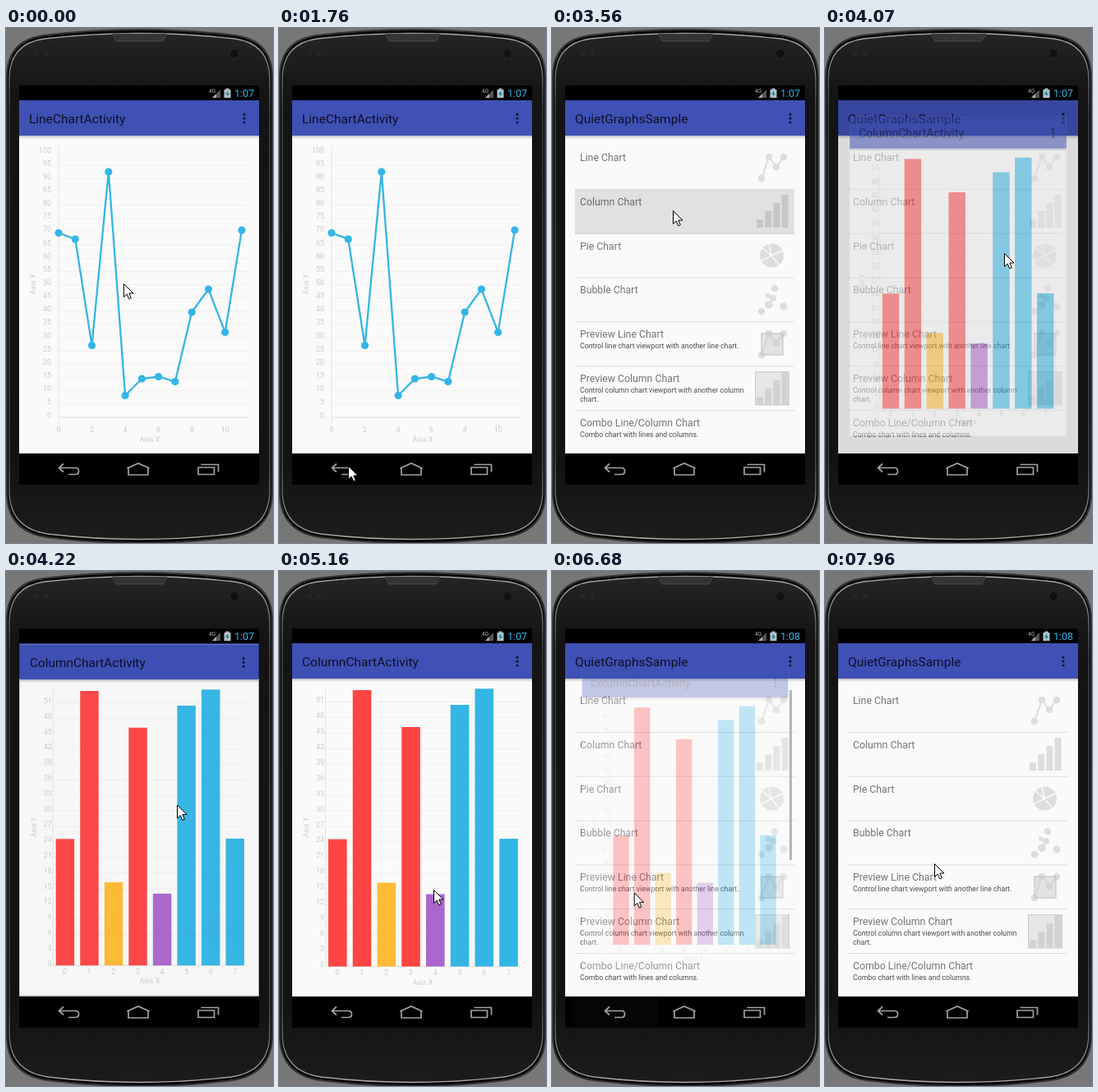
Animation of 325x627 px, one loop 8000 ms. Source, as an HTML page:

```html
<!DOCTYPE html>
<html lang="en">
<head>
<meta charset="utf-8">
<title>Chart app on a phone</title>
<style>
  html, body { margin: 0; width: 100%; height: 100%; overflow: hidden; background: #777; }
  svg { display: block; width: 100%; height: 100%; }
  text { font-family: Roboto, "Noto Sans", sans-serif; }
  .title { font-size: 15.5px; fill: #0d1026; }
  .item { font-size: 12.3px; fill: #747474; }
  .sub { font-size: 8.75px; fill: #4c4c4c; }
  .label { font-size: 9px; fill: #cbcbcb; }
  .icon { fill: #ddd; stroke: #ddd; stroke-width: 0; }
  .nav { fill: none; stroke: #a2a2a2; stroke-width: 1.7; }
</style>
</head>
<body>
<svg viewBox="0 0 325 627" preserveAspectRatio="none">
  <defs>
    <linearGradient id="shade" x2="0" y2="1">
      <stop offset="0" stop-opacity=".24"/><stop offset="1" stop-opacity="0"/>
    </linearGradient>
    <linearGradient id="shell" x2="0" y2="1">
      <stop offset="0" stop-color="#252525"/><stop offset=".12" stop-color="#141414"/>
      <stop offset=".85" stop-color="#131313"/><stop offset="1" stop-color="#1c1c1c"/>
    </linearGradient>
    <linearGradient id="rim" x2="0" y2="1">
      <stop offset="0" stop-color="#aaa"/><stop offset=".15" stop-color="#4a4a4a"/>
      <stop offset=".85" stop-color="#555"/><stop offset="1" stop-color="#aaa"/>
    </linearGradient>
    <clipPath id="screen"><rect x="16" y="88" width="292" height="430"/></clipPath>
    <clipPath id="navClip"><rect x="16" y="518" width="292" height="38"/></clipPath>
  </defs>

  <rect width="325" height="627" fill="#777"/>
  <path d="M1 60Q1 15 46 9Q162 -5 279 9Q324 15 324 60V565Q324 613 275 620Q162 634 50 620Q1 613 1 565Z" fill="#050505" stroke="#333" stroke-width="2"/>
  <path d="M4 62Q4 19 47 13Q162 0 278 13Q321 19 321 62V563Q321 609 274 616Q162 629 51 616Q4 609 4 563Z" fill="url(#shell)" stroke="url(#rim)" stroke-width="1.3"/>
  <path d="M129 7H196L191 16H134Z" fill="#343434" stroke="#555" stroke-width=".7"/>
  <g fill="#262626"><circle cx="37" cy="31" r="3"/><circle cx="49" cy="31" r="3"/></g>
  <circle cx="278" cy="31" r="5.5" fill="#111" stroke="#272727"/>

  <rect x="16" y="70" width="292" height="486"/>
  <g>
    <text x="247" y="79" font-size="6.5" fill="#bbb">4G</text>
    <path d="M251 85L261 75V85Z" fill="#555"/><path d="M251 85L256 80V85Z" fill="#aaa"/>
    <path d="M265.500 75H267.500V73.500H271.500V75H273.500V85H265.500Z" fill="#b5c3c8"/>
    <path d="M270.500 76L267 80.500H269.500L268.500 84L272 79.500H269.700Z" fill="#087b9f"/>
    <text id="clock" x="302" y="84" text-anchor="end" font-size="12.500" fill="#33b5e5"></text>
  </g>

  <g clip-path="url(#screen)">
    <g id="list"></g>
    <rect id="press" x="28" y="197" width="267" height="53.500" opacity="0"/>
    <rect id="scroll" x="289" y="145" width="3" height="207" fill="#b4b4b4"/>
    <rect id="dim" x="16" y="88" width="292" height="430"/>
    <g id="line"></g>
    <g id="column"></g>
  </g>

  <circle id="ripple" cx="77" cy="537" fill="#fff" clip-path="url(#navClip)"/>
  <g class="nav">
    <path d="M70 530.500L64.500 535.500L70 540.500M64.500 535.500H84.500Q88.500 535.500 88.500 539.500T84.500 543.500H76"/>
    <path d="M147.500 536L161 530L174.500 536H173V544H149V536Z"/>
    <path d="M234 535H253.500V543.500H234ZM237.500 531.500H258.500V540.500"/>
  </g>
  <path id="cursor" d="M.5.5V16.500L4.200 13L6.700 18.800L9.300 17.700L6.800 12H12Z" fill="#fff" stroke="#000"/>
</svg>
<script>
const $ = id => document.getElementById(id);
const text = (cls, x, y, s, more = '') => `<text class="${cls}" x="${x}" y="${y}" ${more}>${s}</text>`;
const rect = (x, y, w, h, fill) => `<rect x="${x}" y="${y}" width="${w}" height="${h}"${fill ? ` fill="${fill}"` : ''}/>`;
const dot = (x, y, r) => `<circle cx="${x}" cy="${y}" r="${r}"/>`;
const hline = (x1, x2, y, color) => `<path d="M${x1} ${y}H${x2}" stroke="${color}"/>`;
const range = (n, f) => Array.from({ length: n }, (_, i) => f(i)).join('');

const page = (title, body) =>
  rect(16, 88, 292, 430, '#fafafa') + rect(16, 88, 292, 43, '#3f51b5') + rect(16, 131, 292, 4, 'url(#shade)') +
  text('title', 28, 115.5, title) +
  `<g fill="#10132a">${[105, 110, 115].map(y => dot(290, y, 1.6)).join('')}</g>` + body;

// List page
const zigzag = (x, y) => {
  const pts = [[x, y], [x + 9, y - 26], [x + 18, y - 14], [x + 27, y - 26]];
  return `<polyline points="${pts}" fill="none" stroke-width="2"/>` + pts.map(p => dot(...p, 4.3)).join('');
};
const stairs = y => range(4, i => rect(249 + i * 10.2, y - 10 - i * 10, 8, 10 + i * 10));
const rows = [
  ['Line Chart'], ['Column Chart'], ['Pie Chart'], ['Bubble Chart'],
  ['Preview Line Chart', 'Control line chart viewport with another line chart.'],
  ['Preview Column Chart', 'Control column chart viewport with another column', 'chart.'],
  ['Combo Line/Column Chart', 'Combo chart with lines and columns.']
];
const icons = '<g class="icon">' + zigzag(255, 183) + stairs(243) +
  dot(267.5, 277, 14.5) +
  '<path d="M267 277L264 262M267 277L281 271M267 277L254 284M267 277L277 289M267 277L255 267" stroke="#fafafa" stroke-width="1.5"/>' +
  dot(255, 345, 4.3) + dot(264, 337, 4.8) + dot(271, 317, 4.3) + dot(282, 339, 4.5) + dot(263, 326, 3) + dot(269, 329, 4) +
  zigzag(255, 398) + '<rect x="255" y="372" width="26" height="26" fill="#ccc" fill-opacity=".5" stroke="#bbb" stroke-width="1"/>' +
  '<rect x="247.5" y="418.5" width="41" height="40.500" fill="#e6e6e6" stroke="#ccc" stroke-width="1"/>' +
  `<g fill="#d2d2d2">${stairs(459)}</g></g>`;
$('list').innerHTML = page('QuietGraphsSample', rows.map(([name, ...subs], i) => {
  const y = 162 + i * 53.8;
  return text('item', 34, y, name) +
    subs.map((s, k) => text('sub', 34, y + 13.2 + k * 10.5, s)).join('') +
    (i < 6 ? hline(28, 295, y + 34.5, '#dcdcdc') : '');
}).join('') + icons);

// Chart pages
const axes = (left, zero, step, n, unit) =>
  range(n, i => {
    const y = zero - i * step;
    return hline(left, 294, y, i ? '#f0f0f0' : '#dedede') +
      text('label', 55, y + .5, i * unit, 'text-anchor="end"');
  }) +
  `<path d="M${left} 143V482" stroke="#e4e4e4"/>` +
  text('label', 175, 503.5, 'Axis X', 'text-anchor="middle"') +
  text('label', 0, 0, 'Axis Y', 'text-anchor="middle" transform="translate(36 312) rotate(-90)"');
const tick = (x, s) => text('label', x, 492, s, 'text-anchor="middle"');

const points = [249.5, 257, 386.5, 175, 447.5, 427, 424.5, 430.5, 346, 318, 370.5, 246]
  .map((y, i) => [64 + i * 20.27, y]);
$('line').innerHTML = page('LineChartActivity',
  axes(64, 474, 16.15, 21, 5) + range(6, i => tick(64 + i * 40.54, i * 2)) +
  `<polyline points="${points}" fill="none" stroke="#33b5e5" stroke-width="2.300"/>` +
  `<g fill="#33b5e5">${points.map(p => dot(...p, 4.6)).join('')}</g>`);

const [red, amber, violet, blue] = ['#f44', '#fb3', '#a6c', '#33b5e5'];
const bars = [[326.5, red], [145, red], [379.5, amber], [190, red], [393.5, violet], [163, blue], [143.3, blue], [326, blue]];
$('column').innerHTML = page('ColumnChartActivity',
  axes(56.5, 481.5, 18.94, 18, 3) +
  bars.map(([y, c], i) => rect(60 + i * 29.75, y, 22.6, 481.5 - y, c) + tick(71 + i * 29.8, i)).join(''));

// Motion: the picture moves in bursts of evenly spaced steps [start, end, steps]
const LOOP = 8000, LEAD = 12;
const bursts = [[150, 920, 7], [1350, 1910, 5], [2220, 3170, 8], [3290, 3290, 1], [3560, 4470, 8],
  [4620, 5580, 8], [5700, 5700, 1], [6000, 6830, 7], [7140, 7960, 7]];
const hold = t => {
  let held = 0;
  for (const [a, b, n] of bursts) {
    if (t + LEAD < a) break;
    const step = (b - a) / (n - 1) || 1;
    held = Math.min(b, a + Math.floor((t + LEAD - a) / step) * step);
  }
  return held;
};
const ramp = (t, a, b) => Math.max(0, Math.min(1, (t - a) / (b - a)));

const path = [[0, 143, 311], [100, 143, 311], [278, 150, 345], [535, 144, 440], [792, 124, 522], [920, 118, 533],
  [1220, 118, 533], [1490, 95, 535], [1630, 84, 533], [2220, 84, 533], [2627, 147, 240], [2763, 150, 226],
  [3170, 147, 222], [3690, 147, 222], [4080, 218, 274], [4340, 198, 295], [4470, 193, 302], [4620, 193, 305],
  [5169, 188, 388], [5306, 150, 475], [5443, 86, 556], [5580, 58, 546], [5700, 63, 537],
  [6000, 63, 537], [6138, 68, 510], [6415, 95, 392], [6830, 102, 391], [7140, 103, 390], [7960, 133, 356], [8000, 133, 356]];
const cursorAt = t => {
  const i = Math.max(1, path.findIndex(p => p[0] >= t));
  const [t0, x0, y0] = path[i - 1], [t1, x1, y1] = path[i];
  const k = ramp(t, t0, t1);
  return [x0 + (x1 - x0) * k, y0 + (y1 - y0) * k];
};

const showWindow = (id, p) => {
  const s = .8 + .2 * p, el = $(id);
  el.setAttribute('opacity', p);
  el.setAttribute('transform', `translate(162 294) scale(${s}) translate(-162 -294)`);
};

function draw(time) {
  const t = hold(time);
  const opened = ramp(t, 3930, 4220);
  showWindow('line', 1 - ramp(t, 2420, 2712));
  showWindow('column', opened * (1 - ramp(t, 6480, 6780)));
  $('dim').setAttribute('opacity', t < 5000 ? .24 * opened : 0);
  $('press').setAttribute('opacity', t >= 3290 && t < 3700 ? .1 : 0);
  $('scroll').setAttribute('opacity', t < 5000 ? 1 - ramp(t, 2760, 3170) : 1 - ramp(t, 7130, 7420));

  const late = t > 5000;
  const radius = late ? 31 * ramp(t, 5900, 6415) + 23 * ramp(t, 6415, 6700) : 50 * ramp(t, 1770, 1910);
  const fade = late ? 1 - ramp(t, 6415, 6800) : 1 - ramp(t, 2220, 2560);
  $('ripple').setAttribute('r', radius);
  $('ripple').setAttribute('opacity', .075 * fade);

  $('clock').textContent = t < 6600 ? '1:07' : '1:08';
  $('cursor').setAttribute('transform', `translate(${cursorAt(t)})`);
}

const start = performance.now();
function frame() {
  draw((performance.now() - start) % LOOP);
  requestAnimationFrame(frame);
}
frame();
</script>
</body>
</html>
```
